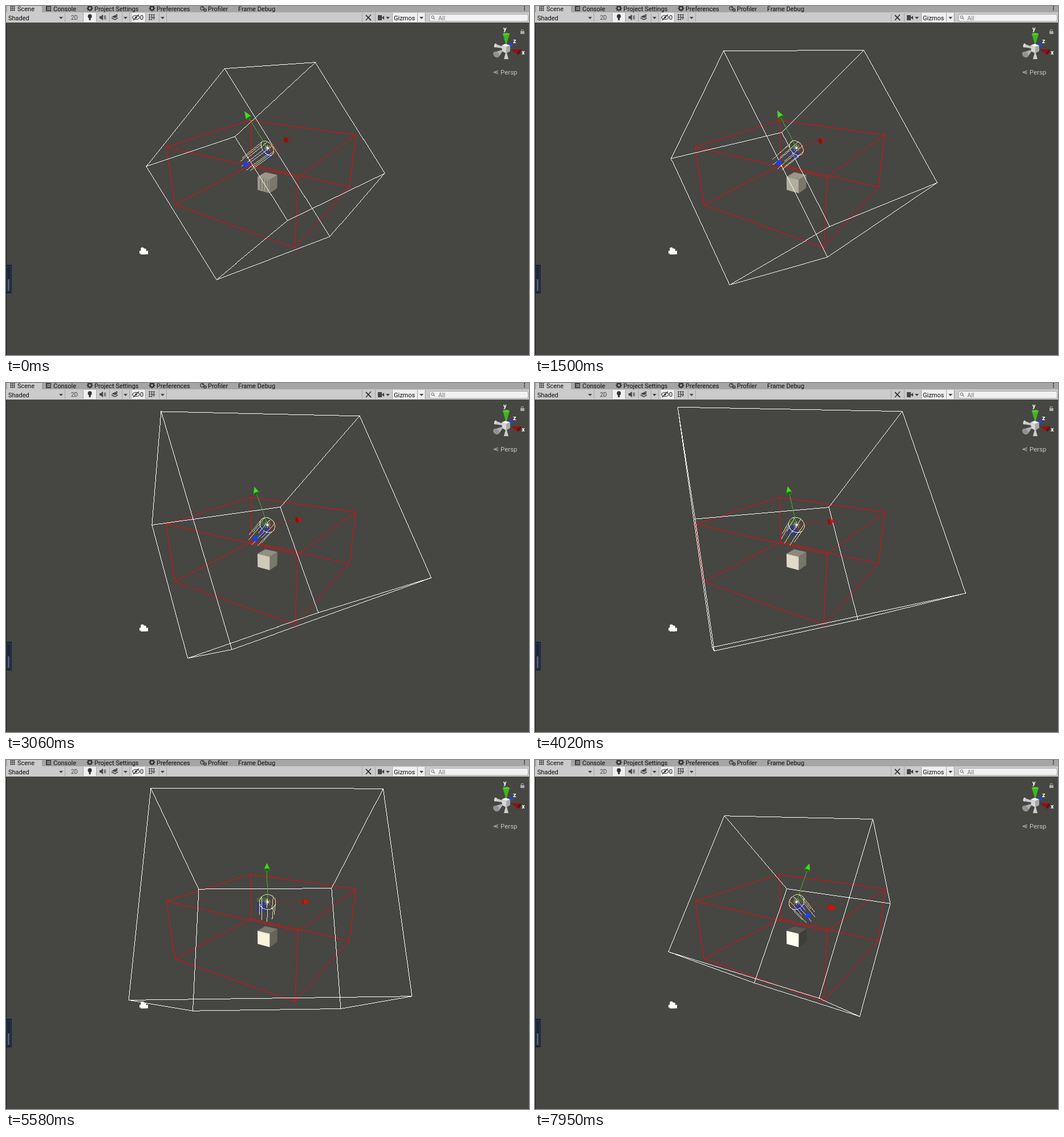
Animation, 917 px wide and 611 px high, one loop 8000 ms. Source, as an HTML page with a canvas:

```html
<!DOCTYPE html>
<html lang="en">
<head>
<meta charset="utf-8">
<title>Scene view</title>
<style>
html, body { margin: 0; width: 100%; height: 100%; overflow: hidden; background: #464643; }
canvas { display: block; }
</style>
</head>
<body>
<canvas id="stage" width="917" height="611"></canvas>
<script>
const ctx = document.getElementById('stage').getContext('2d');
const FONT = 'Roboto, "Liberation Sans", sans-serif';
const LOOP = 8000, TICK = 157.6, FIRST_TICK = 55;
const rad = d => d * Math.PI / 180;

// Camera: pitched down, turned left, looking at a crate at the world origin
const FOCAL = 520.4, PITCH = rad(25), YAW = rad(32);
const SUN_PITCH = rad(40), SUN = [0, 2.5, 0], HANDLE = 2.88;
const FAR_PAD = .24;

// The light's heading in degrees at a few ticks
const turns = [[-1, -87.65], [4, -82.25], [13, -70.9], [25, -51.1], [35, -33.3], [43, -17.55], [50, -3.6]];

function heading(k) {
  let i = 0;
  while (i < turns.length - 2 && k >= turns[i + 1][0]) i++;
  const [k0, a] = turns[i], [k1, b] = turns[i + 1], h = k1 - k0, u = (k - k0) / h;
  const rate = j => {
    const p = turns[Math.max(0, j - 1)], q = turns[Math.min(turns.length - 1, j + 1)];
    return (q[1] - p[1]) / (q[0] - p[0]);
  };
  const s = u * u * (3 - 2 * u);
  return rad(a + (b - a) * s + h * u * (1 - u) * (rate(i) * (1 - u) - rate(i + 1) * u));
}

const dot = (a, b) => a[0] * b[0] + a[1] * b[1] + a[2] * b[2];
const add = (a, b, k = 1) => a.map((v, i) => v + b[i] * k);
const mix = (base, ...terms) => terms.reduce((p, [v, k]) => add(p, v, k), base);

function project([x, y, z]) {
  const r = x * Math.cos(YAW) + z * Math.sin(YAW);
  const d = z * Math.cos(YAW) - x * Math.sin(YAW);
  const up = .44 + y * Math.cos(PITCH) + d * Math.sin(PITCH);
  const depth = 20.76 - y * Math.sin(PITCH) + d * Math.cos(PITCH);
  return [458.5 + FOCAL * r / depth, 320 - FOCAL * up / depth, depth];
}

// Corner i takes its low or high bound on each axis from the bits of i
const corners = (lo, hi) => [...Array(8).keys()].map(i => lo.map((v, a) => i >> a & 1 ? hi[a] : v));
const edges = [];
for (let i = 0; i < 8; i++)
  for (const bit of [1, 2, 4]) if (!(i & bit)) edges.push([i, i | bit]);

const volume = corners([-4.5, -1, -4.5], [4.5, 3, 4.5]);
const crateCorners = corners([-.5, -.5, -.5], [.5, .5, .5]);

function sunAxes(a) {
  const s = Math.sin(a), c = Math.cos(a), sp = Math.sin(SUN_PITCH), cp = Math.cos(SUN_PITCH);
  return [[c, 0, -s], [sp * s, cp, sp * c], [cp * s, -sp, cp * c]];
}

// Smallest box around the volume, aligned to the light
function shadowBox(axes) {
  const lo = axes.map(v => Math.min(...volume.map(p => dot(p, v))));
  const hi = axes.map(v => Math.max(...volume.map(p => dot(p, v))));
  hi[2] += FAR_PAD;
  return corners(lo, hi).map(c => mix([0, 0, 0], ...axes.map((v, i) => [v, c[i]])));
}

// Hard one pixel line, without smoothing
function pixelLine(a, b, color) {
  const dx = b[0] - a[0], dy = b[1] - a[1];
  const n = Math.max(1, Math.ceil(Math.max(Math.abs(dx), Math.abs(dy))));
  ctx.fillStyle = color;
  for (let i = 0; i <= n; i++)
    ctx.fillRect(Math.floor(a[0] + dx * i / n), Math.floor(a[1] + dy * i / n), 1, 1);
}
const line3 = (a, b, color) => pixelLine(project(a), project(b), color);
function wire(pts, color) {
  for (const [i, j] of edges) line3(pts[i], pts[j], color);
}
function poly(pts, color) {
  ctx.fillStyle = color;
  ctx.beginPath();
  for (const p of pts) ctx.lineTo(p[0], p[1]);
  ctx.fill();
}
function rect(x, y, w, h, color) {
  ctx.fillStyle = color;
  ctx.fillRect(x, y, w, h);
}
function oval(x, y, rx, ry, color, turn = 0) {
  ctx.fillStyle = color;
  ctx.beginPath();
  ctx.ellipse(x, y, rx, ry, turn, 0, 7);
  ctx.fill();
}
function ring(x, y, rx, ry, color, w = 1.2) {
  ctx.strokeStyle = color;
  ctx.lineWidth = w;
  ctx.beginPath();
  ctx.ellipse(x, y, rx, ry, 0, 0, 7);
  ctx.stroke();
}
function stroke(pts, color, w = 1.2) {
  ctx.strokeStyle = color;
  ctx.lineWidth = w;
  ctx.beginPath();
  for (const p of pts) ctx.lineTo(p[0], p[1]);
  ctx.stroke();
}
function text(s, x, y, color = '#0c0c0c', size = 11, weight = '') {
  ctx.fillStyle = color;
  ctx.font = `${weight} ${size}px ${FONT}`;
  ctx.fillText(s, x, y);
}

function crate(a) {
  const facing = Math.cos(a), side = -Math.sin(a);
  const p = crateCorners.map(project);
  const face = (ids, v) => poly(ids.map(i => p[i]), `rgb(${v},${v * .975},${v * .89})`);
  face([2, 3, 7, 6], 85 + 70 * side);
  face([0, 1, 3, 2], 150 + 118 * facing);
  face([1, 5, 7, 3], Math.min(122, 58 + 80 * side));
  const dark = `rgba(45,42,35,${Math.max(0, .5 - 3 * facing)})`;
  for (const x of [-.25, -.02, .2, .38])
    stroke([[x, .42, -.5], [x, -.45, -.5]].map(project), dark, 1.5);
}

function cone(axis, color, shade) {
  const [u, v] = Math.abs(axis[1]) > .9 ? [[1, 0, 0], [0, 0, 1]] : [[0, 1, 0], [axis[2], 0, -axis[0]]];
  // Flatten the helpers onto the plane across the axis
  const flat = w => { const q = add(w, axis, -dot(w, axis)), n = Math.hypot(...q); return q.map(c => c / n); };
  const fu = flat(u), fv = flat(add(v, fu, -dot(v, fu)));
  const base = add(SUN, axis, HANDLE * .82), tip = project(add(SUN, axis, HANDLE));
  const rim = [...Array(25).keys()].map(i => {
    const t = i * Math.PI / 12;
    return project(mix(base, [fu, .2 * Math.cos(t)], [fv, .2 * Math.sin(t)]));
  });
  const body = () => { for (let i = 0; i < 24; i++) poly([tip, rim[i], rim[i + 1]], color); };
  const away = tip[2] > project(base)[2];
  if (away) body();
  poly(rim, shade);
  if (!away) body();
}

function handle([X, Y, Z]) {
  const depth = project(SUN)[2];
  // Plane squares lie on the side nearest to the camera
  const near = [X, Y, Z].map(v => [v, project(add(SUN, v, .1))[2] > depth ? -.7 : .7]);
  const square = (p, q, color) => poly([SUN, mix(SUN, p), mix(SUN, p, q), mix(SUN, q)].map(project), color);
  square(near[1], near[2], 'rgba(200,40,30,.15)');
  square(near[0], near[2], 'rgba(70,190,40,.25)');
  square(near[0], near[1], 'rgba(40,52,165,.6)');

  line3(SUN, add(SUN, X, HANDLE * .82), 'rgba(200,25,15,.6)');
  const rim = t => mix(SUN, [X, .54 * Math.cos(t)], [Y, .54 * Math.sin(t)]);
  for (let i = 0; i < 32; i++) line3(rim(i * Math.PI / 16), rim((i + 1) * Math.PI / 16), '#ecdcae');
  for (let i = 0; i < 8; i++) {
    const p = rim(i * Math.PI / 4);
    line3(p, add(p, Z, HANDLE * .82), '#e3dcaa');
  }
  line3(SUN, add(SUN, Y, HANDLE * .82), '#48b52c');
  cone(Y, '#4be022', '#1f6a14');
  cone(X, '#d0160c', '#8a140c');

  // The forward arrow fades out when it runs along the view
  const across = Math.abs(Z[0] * Math.cos(YAW) + Z[2] * Math.sin(YAW));
  ctx.globalAlpha = Math.min(1, Math.max(0, (across - .27) / .08));
  line3(SUN, add(SUN, Z, HANDLE * .82), '#3349c8');
  cone(Z, '#1d3ff0', '#1d3ff0');
  ctx.globalAlpha = 1;

  const [x, y] = project(SUN);
  for (let i = 0; i < 4; i++) {
    const dx = Math.cos(i * Math.PI / 4) * 5, dy = Math.sin(i * Math.PI / 4) * 5;
    pixelLine([x - dx, y - dy], [x + dx, y + dy], 'rgba(235,230,200,.7)');
  }
  oval(x, y, 2, 2, '#f3efda');
}

function caret(x) { poly([[x - 3, 19], [x + 4, 19], [x + .5, 23]], '#444'); }
function gear(x, y) {
  ring(x, y, 3, 3, '#333', 2);
  for (let i = 0; i < 8; i++) {
    const a = i * Math.PI / 4;
    rect(x + 4.4 * Math.cos(a) - 1, y + 4.4 * Math.sin(a) - 1, 2, 2, '#333');
  }
}
function grid(x, y, step, n) {
  for (let i = 0; i < 3; i++) {
    rect(x, y + 1 + i * step, n, 1, '#444');
    rect(x + 1 + i * step, y, 1, n, '#444');
  }
}

function tabs() {
  rect(0, 0, 917, 12, '#a5a5a5');
  rect(2, 0, 61, 12, '#cbcbcb');
  grid(7, 0, 3, 9);
  text('Scene', 20, 9);
  rect(70, 0, 9, 9, '#3c3c3c');
  for (const y of [2, 4, 6]) rect(72, y, 6, 1, '#bbb');
  text('Console', 83, 9);
  gear(147, 4);
  text('Project Settings', 155, 9);
  gear(256, 4);
  text('Preferences', 264, 9);
  ring(344, 4, 3.2, 3.2, '#333');
  stroke([[344, 4], [346, 1]], '#333');
  ring(349, 7, 2, 2, '#333', 1.5);
  text('Profiler', 354, 9);
  text('Frame Debug', 407, 9);
  for (const y of [0, 3, 6]) rect(908, y, 2, 2, '#444');
}

function toolbar() {
  rect(0, 11, 917, 18, '#cbcbcb');
  for (const [x, w] of [[136, 22], [221, 23], [678, 56]]) rect(x, 12, w, 16, '#efefef');
  for (const x of [103, 135, 158, 181, 203, 216, 244, 268, 281, 624, 647, 677, 721, 735])
    rect(x, 12, 1, 16, '#a6a6a6');
  for (const x of [96, 209, 274, 669, 728]) caret(x);
  text('Shaded', 4, 25);
  text('2D', 114, 24, '#444', 10);
  text('0', 235, 24);
  text('Gizmos', 680, 25);

  oval(147, 18, 3.5, 3.8, '#333');
  rect(145.5, 21, 3, 4, '#333');
  poly([[164, 18], [166, 18], [170, 15], [170, 25], [166, 22], [164, 22]], '#444');
  stroke([[172, 17], [173, 20], [172, 23]], '#444');
  stroke([[174, 16], [175, 20], [174, 24]], '#555', 1);
  poly([[185, 19], [191, 16], [196, 19], [191, 21]], '#444');
  stroke([[185, 21], [191, 24], [196, 21]], '#444', 1.5);
  stroke([[194, 14], [194, 18]], '#444');
  stroke([[192, 16], [196, 16]], '#444');
  ring(228, 20, 6, 3.5, '#333');
  oval(228, 20, 1.8, 1.8, '#333');
  stroke([[223, 25], [233, 15]], '#333');
  grid(250, 14, 4, 11);
  rect(256, 20, 6, 6, '#cbcbcb');
  stroke([[257, 20], [259, 23], [261, 20]], '#444');
  stroke([[631, 16], [640, 25]], '#333', 1.8);
  stroke([[640, 15], [631, 25]], '#333', 1.5);
  rect(652, 16, 7, 9, '#444');
  poly([[659, 20], [663, 17], [663, 24], [659, 21]], '#444');

  ctx.beginPath();
  ctx.roundRect(742.5, 14.5, 173, 12.5, 3);
  ctx.fillStyle = '#f1f1f1';
  ctx.fill();
  ctx.strokeStyle = '#a3a3a3';
  ctx.lineWidth = 1;
  ctx.stroke();
  ring(748, 19.5, 2.3, 2.3, '#666', 1);
  stroke([[750, 21], [752, 23.5]], '#666');
  text('All', 758, 24.5, '#777', 10.5);
}

function compass() {
  poly([[857, 66], [856, 72], [870, 74], [871, 71]], '#c9c9c9');
  oval(858, 69, 2, 3.5, '#dadada', .3);
  poly([[856, 81], [864, 89], [871, 79], [869, 77]], '#b0b0b0');
  oval(859.5, 85, 6, 4.5, '#929292', .7);
  poly([[873, 93], [881, 93], [878, 82], [876, 82]], '#cdcdcd');
  poly([[882, 69], [885, 64], [891, 68], [885, 72]], '#1c46dc');
  poly([[885, 76], [897, 85], [903, 76]], '#8f1410');
  oval(900, 80.5, 2, 5, '#6f0c0c', .6);
  poly([[871, 49], [883, 49], [878, 66], [876, 66]], '#41b421');
  oval(877, 49, 6, 1.8, '#54d12c');
  poly([[869, 69], [876, 66], [884, 69], [877, 72]], '#f2f2f2');
  poly([[869, 69], [877, 72], [877, 83], [870, 79]], '#d6d6d6');
  poly([[877, 72], [884, 69], [884, 79], [877, 83]], '#a9a9a9');
  text('y', 872, 44, '#fff', 11, 'bold');
  text('z', 889, 65, '#fff', 11, 'bold');
  text('x', 904, 85, '#fff', 11, 'bold');
  rect(902, 44, 7, 5, '#aaa');
  stroke([[903.5, 44], [903.5, 41.5], [907, 41.5], [907, 43]], '#aaa', 1);
  for (const y of [113, 116, 119]) stroke([[855, 116], [863, y]], '#b5b5b5', 1);
  text('Persp', 867, 120, '#c6c6c6', 11.5);
}

function sceneIcons() {
  oval(239, 425, 2.8, 2.5, '#fff');
  oval(243, 427, 3, 2.5, '#fff');
  rect(236, 427, 10, 8, '#fff');
  poly([[234, 428], [238, 431], [234, 434]], '#fff');
  poly([[245, 430], [249, 428], [249, 435], [245, 434]], '#fff');
  rect(0, 30, 1, 581, '#191919');
  rect(0, 453, 10, 50, '#18202f');
  rect(1, 455, 8, 46, '#27324a');
  rect(2, 457, 5, 42, '#1d2638');
  for (let y = 479; y < 498; y += 2) rect(3, y, 3, 1, '#8b95a8');
}

function draw(tick) {
  const a = heading(tick), axes = sunAxes(a);
  rect(0, 0, 917, 611, '#464643');
  crate(a);
  wire(volume, '#f00808');
  wire(shadowBox(axes), '#fff');
  handle(axes);
  sceneIcons();
  compass();
  tabs();
  toolbar();
}

const start = performance.now();
let shown;
function frame() {
  const now = (performance.now() - start) % LOOP;
  const tick = Math.floor((now - FIRST_TICK) / TICK);
  if (tick !== shown) draw(shown = tick);
  requestAnimationFrame(frame);
}
frame();
</script>
</body>
</html>
```
